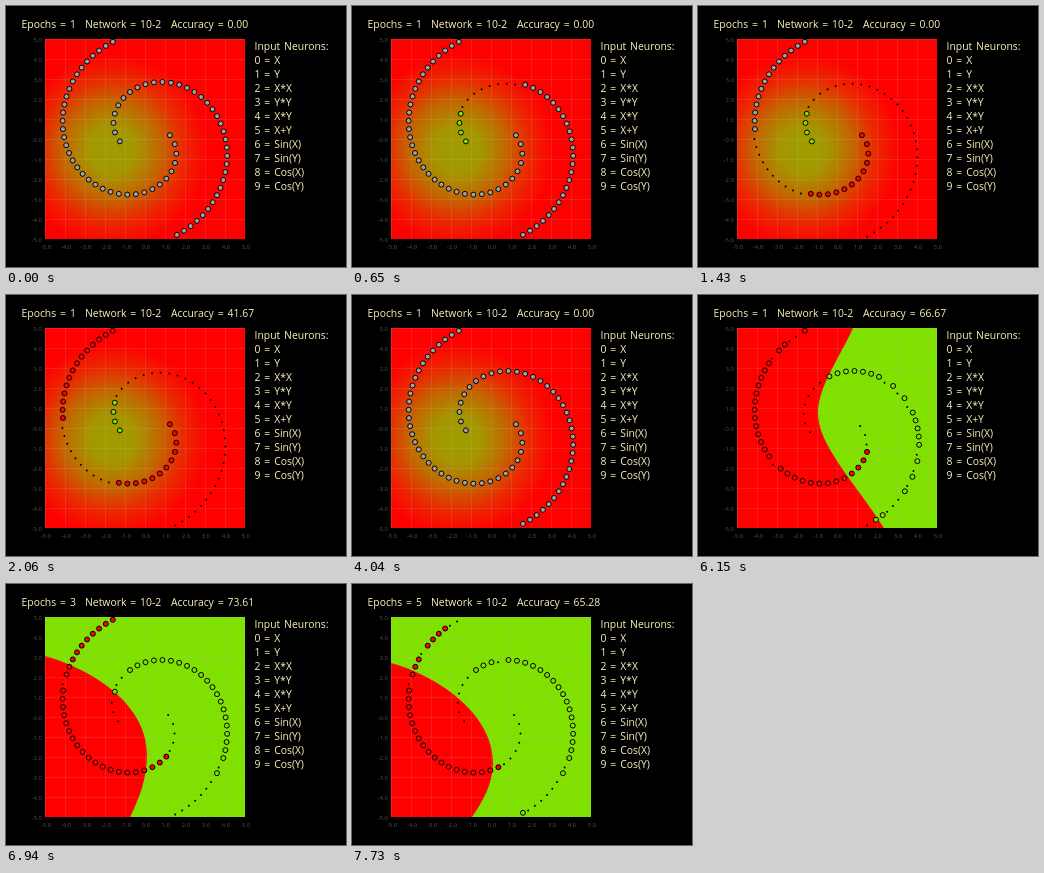
Animation of 340 by 261 pixels, one loop 8 s. Source, as an HTML page with a canvas:

```html
<!DOCTYPE html>
<html lang="en">
<head>
<meta charset="utf-8">
<title>Two spirals classifier</title>
<style>
html, body { margin: 0; width: 100%; height: 100%; overflow: hidden; background: #000; }
canvas { display: block; }
</style>
</head>
<body>
<canvas id="stage" width="340" height="261"></canvas>
<script>
const ctx = document.getElementById('stage').getContext('2d');
const LOOP = 8000;
const PER_ARM = 36;
const LEFT = 39, TOP = 33, SIZE = 200, UNIT = 20;
const RED = '#ff0000', GREEN = '#80e000', GRAY = '#a0a0a0', TEXT = '#fcf0bc';
const TEXT_FONT = '10.4px "Open Sans", "Noto Sans", sans-serif';
const INPUTS = ['X', 'Y', 'X*X', 'Y*Y', 'X*Y', 'X+Y', 'Sin(X)', 'Sin(Y)', 'Cos(X)', 'Cos(Y)'];

// "0-3 7" -> Set {0, 1, 2, 3, 7}
function indices(text) {
  const set = new Set();
  for (const part of text.split(' ')) {
    const [from, to = from] = part.split('-').map(Number);
    for (let i = from; i <= to; i++) set.add(i);
  }
  return set;
}

// border: start point followed by two cubic segments enclosing the red side
function epoch(start, number, accuracy, green, red, border) {
  return { start, number, accuracy, wrong: [indices(green), indices(red)], border };
}

const FIRST_WRONG = [indices('4-35'), indices('12-21')];
const EPOCHS = [
  epoch(6150, 1, '66.67', '0-6 14 16 18 24 26 28 30-32 35', '0-2 16 30 33-34',
    [155, 33, 142, 62, 120, 92, 120, 118, 120, 150, 155, 185, 186, 233]),
  epoch(6540, 2, '48.61', '0-8 20-35', '0-5 22-27',
    [80, 33, 100, 60, 127, 95, 130, 130, 133, 165, 148, 205, 160, 233]),
  epoch(6940, 3, '73.61', '0-2 4-5 27 29-35', '0-4 25',
    [39, 72, 95, 88, 141, 125, 141, 170, 141, 195, 133, 215, 124, 233]),
  epoch(7340, 4, '65.28', '0-5 23 27-35', '0-5 25-26 35',
    [39, 76, 95, 92, 141, 130, 141, 174, 141, 198, 132, 216, 122, 233]),
  epoch(7730, 5, '65.28', '0-5 9 27 29-34', '0-6 25 29 34-35',
    [39, 79, 95, 95, 141, 135, 141, 178, 141, 200, 131, 217, 120, 233])
];

// Archimedean arm with nearly equal area per point; the green arm mirrors the red one
function spiralPoint(i, side) {
  const degrees = Math.sqrt(5580 + 3015 * i) - 81.7;
  const radius = 0.2958 * (degrees + 92.2) * side;
  const angle = degrees * Math.PI / 180;
  return [138.9 + radius * Math.cos(angle), 132.3 + radius * Math.sin(angle)];
}

const ARMS = [-1, 1].map(side =>
  Array.from({ length: PER_ARM }, (_, i) => spiralPoint(i, side)));

// Number of points already checked during the first pass
function checkedCount(t) {
  const keys = [[500, 1], [1010, 39], [1060, 39], [1290, 49], [1630, 72]];
  if (t < 500 || t >= 4040) return 0;
  for (let k = 1; k < keys.length; k++) {
    const [t0, n0] = keys[k - 1], [t1, n1] = keys[k];
    if (t < t1) return Math.floor(n0 + (n1 - n0) * (t - t0) / (t1 - t0));
  }
  return 2 * PER_ARM;
}

function drawGlow() {
  const glow = ctx.createRadialGradient(106, 144, 0, 106, 144, 96);
  glow.addColorStop(0, 'rgb(158,158,0)');
  glow.addColorStop(0.25, 'rgb(164,150,0)');
  glow.addColorStop(0.5, 'rgb(194,104,0)');
  glow.addColorStop(0.75, 'rgb(235,40,0)');
  glow.addColorStop(1, RED);
  ctx.fillStyle = glow;
  ctx.fillRect(LEFT, TOP, SIZE, SIZE);
}

function drawRegions(b) {
  ctx.fillStyle = GREEN;
  ctx.fillRect(LEFT, TOP, SIZE, SIZE);
  ctx.fillStyle = RED;
  ctx.beginPath();
  ctx.moveTo(b[0], b[1]);
  ctx.bezierCurveTo(...b.slice(2, 8));
  ctx.bezierCurveTo(...b.slice(8));
  ctx.lineTo(LEFT, TOP + SIZE);
  ctx.lineTo(LEFT, TOP);
  ctx.fill();
}

function drawGrid() {
  ctx.fillStyle = 'rgba(200,200,200,0.14)';
  for (let p = 0; p < SIZE; p += UNIT) {
    ctx.fillRect(LEFT + p, TOP, 1, SIZE);
    ctx.fillRect(LEFT, TOP + p, SIZE, 1);
  }
  ctx.fillStyle = '#505050';
  ctx.wordSpacing = '0px';
  ctx.font = '6px "Open Sans", "Noto Sans", sans-serif';
  for (let k = -5; k <= 5; k++) {
    ctx.textAlign = 'center';
    ctx.fillText(k.toFixed(1), 140 + k * UNIT, 243);
    ctx.textAlign = 'right';
    ctx.fillText(k ? k.toFixed(1) : '-0.0', 36, 136 - k * UNIT);
  }
}

function disc(x, y, radius, fill) {
  ctx.beginPath();
  ctx.arc(x, y, radius, 0, 2 * Math.PI);
  ctx.fillStyle = fill;
  ctx.fill();
}

// Rejected points shrink to a dot near the lower left of their circle
function drawPoint([x, y], fill) {
  if (!fill) {
    disc(x - 1.8, y + 1.8, 1, '#000');
    return;
  }
  disc(x, y, 2.5, fill);
  ctx.lineWidth = 1;
  ctx.strokeStyle = '#000';
  ctx.stroke();
}

function drawPoints(wrong, checked) {
  ARMS.forEach((points, arm) => points.forEach((point, i) => {
    const done = arm * PER_ARM + i < checked;
    const color = arm ? RED : GREEN;
    drawPoint(point, !done ? GRAY : wrong[arm].has(i) ? null : color);
  }));
}

function drawText(number, accuracy) {
  ctx.fillStyle = TEXT;
  ctx.font = TEXT_FONT;
  ctx.wordSpacing = '1.2px';
  ctx.textAlign = 'left';
  ctx.fillText('Epochs = ' + number, 15.5, 22);
  ctx.fillText('Network = 10-2', 79, 22);
  ctx.fillText('Accuracy = ' + accuracy, 165, 22);
  ctx.fillText('Input Neurons:', 248.5, 44);
  INPUTS.forEach((name, i) => ctx.fillText(i + ' = ' + name, 248.5, 58 + 14 * i));
}

function render(t) {
  const current = EPOCHS.filter(e => t >= e.start).pop();
  ctx.fillStyle = '#000';
  ctx.fillRect(0, 0, 340, 261);
  if (current) drawRegions(current.border);
  else drawGlow();
  drawGrid();
  if (current) {
    drawPoints(current.wrong, 2 * PER_ARM);
    drawText(current.number, current.accuracy);
  } else {
    drawPoints(FIRST_WRONG, checkedCount(t));
    drawText(1, t >= 2060 && t < 4040 ? '41.67' : '0.00');
  }
}

const begin = performance.now();
function tick() {
  render((performance.now() - begin) % LOOP);
  requestAnimationFrame(tick);
}
tick();
</script>
</body>
</html>
```
